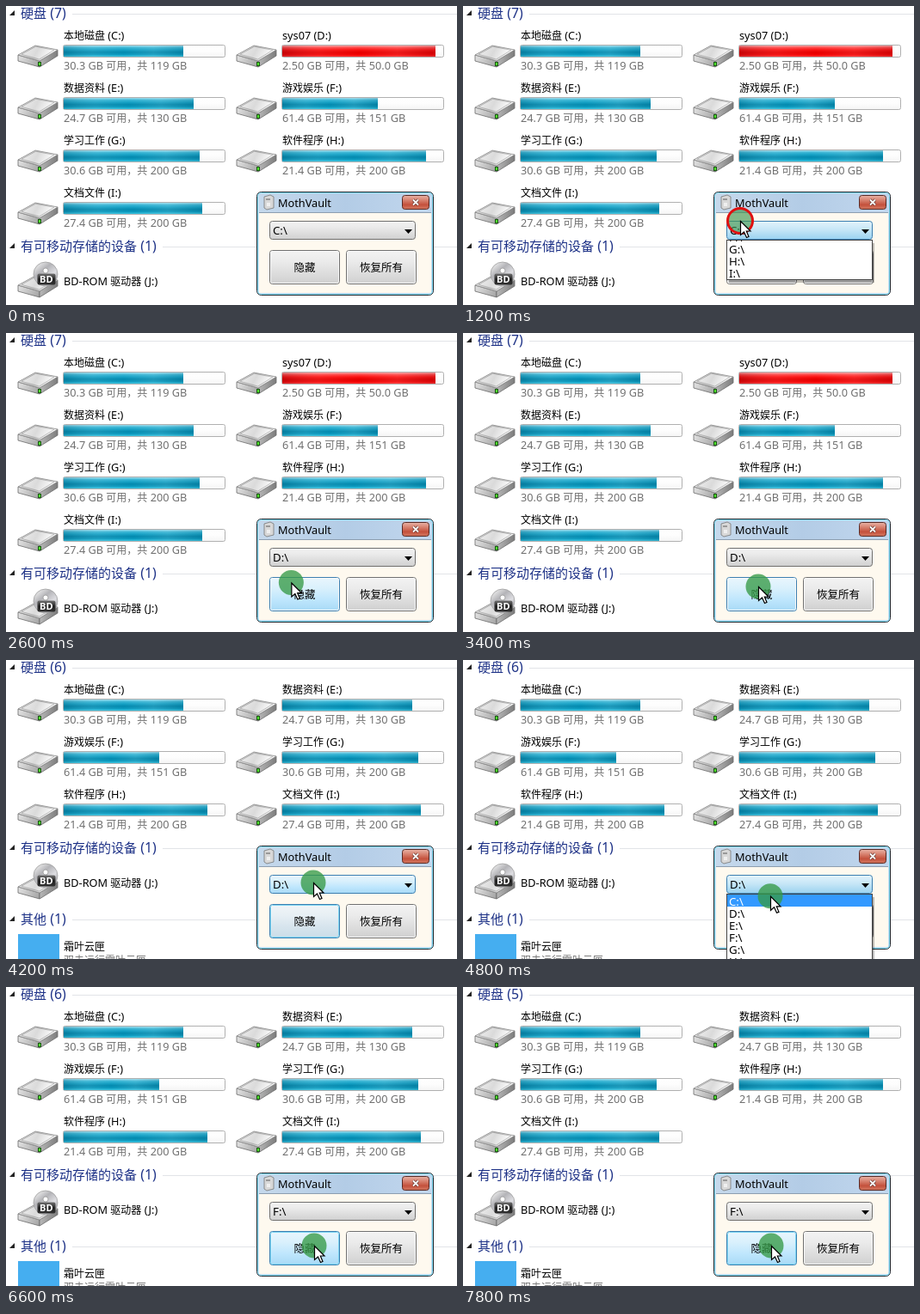
Recreate the animation shown at these times as an HTML page with a canvas. Size 524 by 348 pixels, loop 8 s.

```html
<!DOCTYPE html>
<html lang="zh">
<head>
<meta charset="utf-8">
<style>
  html, body { margin: 0; width: 100%; height: 100%; overflow: hidden; background: #fff; }
  canvas { display: block; }
</style>
</head>
<body>
<canvas id="stage" width="524" height="348"></canvas>
<script>
const ctx = document.getElementById('stage').getContext('2d');
const LOOP = 8000, STEP = 200;
const LATIN = '"Noto Sans", "Open Sans", sans-serif';
const HAN = '"Noto Sans CJK SC", "Noto Sans CJK", sans-serif';

// letter, name, free GB, total GB
const DISKS = [
  ['C', '本地磁盘', '30.3', '119'],
  ['D', 'sys07', '2.50', '50.0'],
  ['E', '数据资料', '24.7', '130'],
  ['F', '游戏娱乐', '61.4', '151'],
  ['G', '学习工作', '30.6', '200'],
  ['H', '软件程序', '21.4', '200'],
  ['I', '文档文件', '27.4', '200']
];
const BLUE = ['#9fdcec', '#35b4d4', '#14a0c4', '#0389ae', '#0898bd', '#3cc6e2'];
const RED = ['#ffa0a0', '#ff4040', '#fa1010', '#e60000', '#f00000', '#ff3030'];
const GREY = ['#f3f3f3', '#ebebeb', '#dddddd', '#cfcfcf'];
const HOT = ['#eaf6fd', '#d9f0fc', '#bee6fd', '#a7d9f5'];
const DOWN = ['#e5f4fc', '#c4e5f6', '#98d1ef'];
const FOCUS = ['#f1f5f8', '#e7eff4', '#d6e4ed', '#cadde8'];

// Each round opens the menu, picks a drive, then hides it.
const ROUND = 3200, FIRST = 1200;
const OPEN = 0, PICK = 1000, CLOSE = 1200, HIDE = 2400, REFRESH = 2600;
const PICKS = 'DF';

// pointer moves: depart, arrive, x, y
const MOVES = [
  [600, 600, 172, 207],
  [600, 1200, 322, 250],
  [1400, 2000, 330, 290],
  [2400, 3400, 343, 295],
  [3800, 4200, 357, 259],
  [4600, 5200, 357, 320],
  [5600, 6600, 358, 301]
];

function pointerAt(t) {
  if (t < MOVES[0][0]) return null;
  let [, , x, y] = MOVES[0];
  for (const [from, to, nx, ny] of MOVES.slice(1)) {
    const p = Math.min(1, Math.max(0, (t - from) / (to - from)));
    const k = p * p * (3 - 2 * p);
    x += (nx - x) * k;
    y += (ny - y) * k;
  }
  return { x, y };
}

function stateAt(t) {
  const round = t < FIRST ? -1 : Math.min(PICKS.length - 1, Math.floor((t - FIRST) / ROUND));
  const s = round < 0 ? -1 : t - FIRST - round * ROUND;
  const before = Math.max(0, round);
  return {
    s,
    open: s >= OPEN && s < CLOSE,
    settling: s >= OPEN && s <= CLOSE,
    clicked: [OPEN, PICK, HIDE].includes(s),
    chosen: ('C' + PICKS)[before + (s >= CLOSE)],
    hidden: PICKS.slice(0, before + (s >= REFRESH)),
    focused: round > 0 || s >= HIDE,
    pointer: pointerAt(t)
  };
}

function fade(x0, y0, x1, y1, colors) {
  const g = ctx.createLinearGradient(x0, y0, x1, y1);
  colors.forEach((c, i) => g.addColorStop(i / (colors.length - 1), c));
  return g;
}

function rect(x, y, w, h, fill) {
  ctx.fillStyle = fill;
  ctx.fillRect(x, y, w, h);
}

function paint(fill, stroke, width = 1) {
  if (fill) {
    ctx.fillStyle = fill;
    ctx.fill();
  }
  if (stroke) {
    ctx.strokeStyle = stroke;
    ctx.lineWidth = width;
    ctx.stroke();
  }
}

function round(x, y, w, h, r, fill, stroke) {
  ctx.beginPath();
  ctx.roundRect(x + .5, y + .5, w - 1, h - 1, r);
  paint(fill, stroke);
}

function poly(points, fill, stroke, width) {
  ctx.beginPath();
  points.forEach(p => ctx.lineTo(p[0], p[1]));
  ctx.closePath();
  paint(fill, stroke, width);
}

function disc(x, y, r, fill, stroke, width) {
  ctx.beginPath();
  ctx.arc(x, y, r, 0, 7);
  paint(fill, stroke, width);
}

// Latin runs are set slightly larger than Chinese ones.
function text(s, x, y, color = '#000', size = 12, centered = false) {
  const runs = s.match(/[\x00-\xff]+|[^\x00-\xff]+/g).map(r => {
    const font = r.charCodeAt(0) < 256 ? `${size * 1.06}px ${LATIN}` : `${size}px ${HAN}`;
    ctx.font = font;
    return { r, font, w: ctx.measureText(r).width };
  });
  if (centered) x -= runs.reduce((sum, run) => sum + run.w, 0) / 2;
  ctx.fillStyle = color;
  for (const run of runs) {
    ctx.font = run.font;
    ctx.fillText(run.r, x, y);
    x += run.w;
  }
  return x;
}

function heading(s, y) {
  poly([[10, y - 4], [10, y + 2], [4, y + 2]], '#222');
  const end = text(s, 17, y + 5, '#1e3287', 15);
  rect(Math.round(end) + 7, y, 524, 1, '#e2e4e8');
}

// A flat box: a top face with two sides extruded downwards.
function drive(x, y, led) {
  const left = [0, 12], back = [20, 1], right = [46, 6], front = [25, 19];
  const drop = ([px, py], d) => [px, py + d];
  const side = (a, b, d, fill) => poly([a, b, drop(b, d), drop(a, d)], fill, '#6a6a6a', .8);
  ctx.save();
  ctx.translate(x, y);
  side(left, front, 7, fade(0, 12, 25, 26, ['#e4e4e4', '#a2a2a2']));
  side(front, right, 7, fade(25, 0, 46, 0, ['#b8b8b8', '#7c7c7c']));
  poly([left, back, right, front], fade(6, 4, 34, 19, ['#e2e2e2', '#c6c6c6', '#f7f7f7']), '#8a8a8a', .8);
  ctx.translate(23 * .18, 10 * .14);
  ctx.scale(.82, .82);
  poly([left, back, right, front], 'rgba(255,255,255,.35)', 'rgba(120,120,120,.5)');
  ctx.restore();
  if (led) {
    rect(x + 23, y + 20, 4, 5, '#1d5a16');
    rect(x + 24, y + 21, 2, 3, '#4fe02c');
  }
}

function diskItem([letter, name, free, total], x, y) {
  const used = Math.round(187 * (1 - free / total));
  drive(x + 14, y + 45, true);
  text(`${name} (${letter}:)`, x + 67, y + 39);
  round(x + 66, y + 45, 189, 15, 2, fade(0, y + 45, 0, y + 60, ['#fff', '#fdfdfd', '#f4f4f4']), '#b0b0b0');
  rect(x + 67, y + 46, used, 13, fade(0, y + 46, 0, y + 59, letter === 'D' ? RED : BLUE));
  rect(x + 67, y + 46, used, 13, fade(x + 67, 0, x + 67 + used, 0,
    ['rgba(0,30,50,.15)', 'rgba(255,255,255,.08)', 'rgba(255,255,255,0)', 'rgba(255,255,255,.1)', 'rgba(0,30,50,.1)']));
  text(`${free} GB 可用，共 ${total} GB`, x + 67, y + 74, '#707070');
}

function explorer(hidden) {
  const disks = DISKS.filter(d => !hidden.includes(d[0]));
  heading(`硬盘 (${disks.length})`, 9);
  disks.forEach((d, i) => diskItem(d, i % 2 * 254, (i >> 1) * 61));

  const y = 36 + Math.ceil(disks.length / 2) * 61;
  heading('有可移动存储的设备 (1)', y);
  drive(14, y + 33, false);
  disc(46, y + 32, 14, fade(36, y + 20, 56, y + 44, ['#ececec', '#b4b4b8', '#dedee2', '#9a9a9e']), '#a0a0a0', .8);
  disc(46, y + 28, 3, '#fff', '#999', .8);
  round(36, y + 31, 22, 14, 2, fade(0, y + 31, 0, y + 45, ['#777', '#222', '#333']));
  ctx.font = `bold 11px ${LATIN}`;
  ctx.fillStyle = '#fff';
  ctx.fillText('BD', 39, y + 42);
  text('BD-ROM 驱动器 (J:)', 67, y + 45);

  heading('其他 (1)', y + 83);
  rect(14, y + 100, 48, 48, '#45aef0');
  text('霜叶云匣', 67, y + 119);
  text('双击运行霜叶云匣', 67, y + 135, '#707070');
}

function button(label, x, fill, edge, glow) {
  round(x, 284, 82, 40, 3, fade(0, 284, 0, 324, fill), edge);
  round(x + 1, 285, 80, 38, 2, null, glow);
  text(label, x + 41, 309, '#000', 12.5, true);
}

function dialog({ s, open, settling, chosen, focused, pointer }) {
  const over = (x, y, w, h) => pointer && !settling &&
    pointer.x >= x && pointer.x < x + w && pointer.y >= y && pointer.y < y + h;

  round(291, 216, 206, 121, 5, fade(291, 0, 497, 0, ['#c6d9ec', '#b3cce6', '#c2d7ee']), '#20252b');
  round(292, 217, 204, 119, 4, null, '#7fdcf2');
  rect(294, 241, 200, 93, '#fef9ef');
  rect(294, 240, 200, 1, '#8d9eb0');

  poly([[300, 222], [307, 220], [311, 222], [311, 235], [303, 237], [300, 235]], '#d8d8d8', '#777', .8);
  rect(302, 224, 5, 2, '#999');
  rect(303, 229, 4, 4, '#efefef');
  text('MothVault', 316, 234);
  round(460, 220, 32, 17, 3, fade(0, 220, 0, 237, ['#eab8ac', '#d98573', '#c4513c', '#d57c64']), '#5a2a24');
  for (const [color, width] of [['#65332b', 3.2], ['#fff', 1.8]]) {
    ctx.strokeStyle = color;
    ctx.lineWidth = width;
    ctx.beginPath();
    for (const d of [-3, 3]) {
      ctx.moveTo(476 - d, 225.5);
      ctx.lineTo(476 + d, 231.5);
    }
    ctx.stroke();
  }

  const hotBox = open || over(306, 250, 170, 22);
  const boxFill = open ? DOWN : hotBox ? HOT : GREY;
  round(306, 250, 170, 22, 3, fade(0, 250, 0, 272, boxFill), hotBox ? '#3c7fb1' : '#707070');
  text(chosen + ':\\', 310, 266, '#000', 12.5);
  poly([[463, 260], [472, 260], [467.5, 265]], '#000');

  const hot = over(306, 284, 82, 40);
  const active = hot || focused;
  const fill = s === HIDE ? DOWN : hot ? HOT : focused ? FOCUS : GREY;
  button('隐藏', 306, fill, active ? '#3c7fb1' : '#707070', focused ? '#7fd6f2' : '#f8f8f8');
  button('恢复所有', 395, GREY, '#707070', '#f8f8f8');
}

function menu({ s, chosen, pointer }) {
  const full = 100, shown = s === OPEN ? 46 : full;
  const row = Math.floor((pointer.y - 273) / 14);
  const active = row >= 0 ? row : DISKS.findIndex(d => d[0] === chosen);
  rect(309, 276, 169, shown, 'rgba(0,0,0,.25)');
  rect(306, 272, 170, shown + 1, '#444');
  rect(307, 273, 168, shown - 1, '#fff');
  ctx.save();
  ctx.beginPath();
  ctx.rect(307, 273, 168, shown - 1);
  ctx.clip();
  DISKS.forEach((d, i) => {
    const y = 273 + i * 14 + shown - full;
    if (i === active) rect(307, y, 168, 14, '#3399ff');
    text(d[0] + ':\\', 309, y + 13, i === active ? '#fff' : '#000', 12.5);
  });
  ctx.restore();
}

function drawPointer({ x, y }, clicked) {
  disc(x, y, 14.5, clicked ? 'rgba(64,150,80,.65)' : 'rgba(54,154,70,.78)');
  if (clicked) disc(x, y, 14.5, null, '#e01010', 3);
  const arrow = [[0, 0], [0, 16], [4, 12.5], [7, 19], [9.5, 18], [6.8, 11.5], [11.5, 11.5]];
  poly(arrow.map(p => [p[0] + x + .5, p[1] + y + .5]), '#fff', '#000', 1.2);
}

function draw(now) {
  const state = stateAt(Math.floor(now % LOOP / STEP) * STEP);
  rect(0, 0, 524, 348, '#fff');
  explorer(state.hidden);
  dialog(state);
  if (state.open) menu(state);
  if (state.pointer) drawPointer(state.pointer, state.clicked);
}

const begin = performance.now();
function tick() {
  draw(performance.now() - begin);
  requestAnimationFrame(tick);
}
tick();
</script>
</body>
</html>
```
